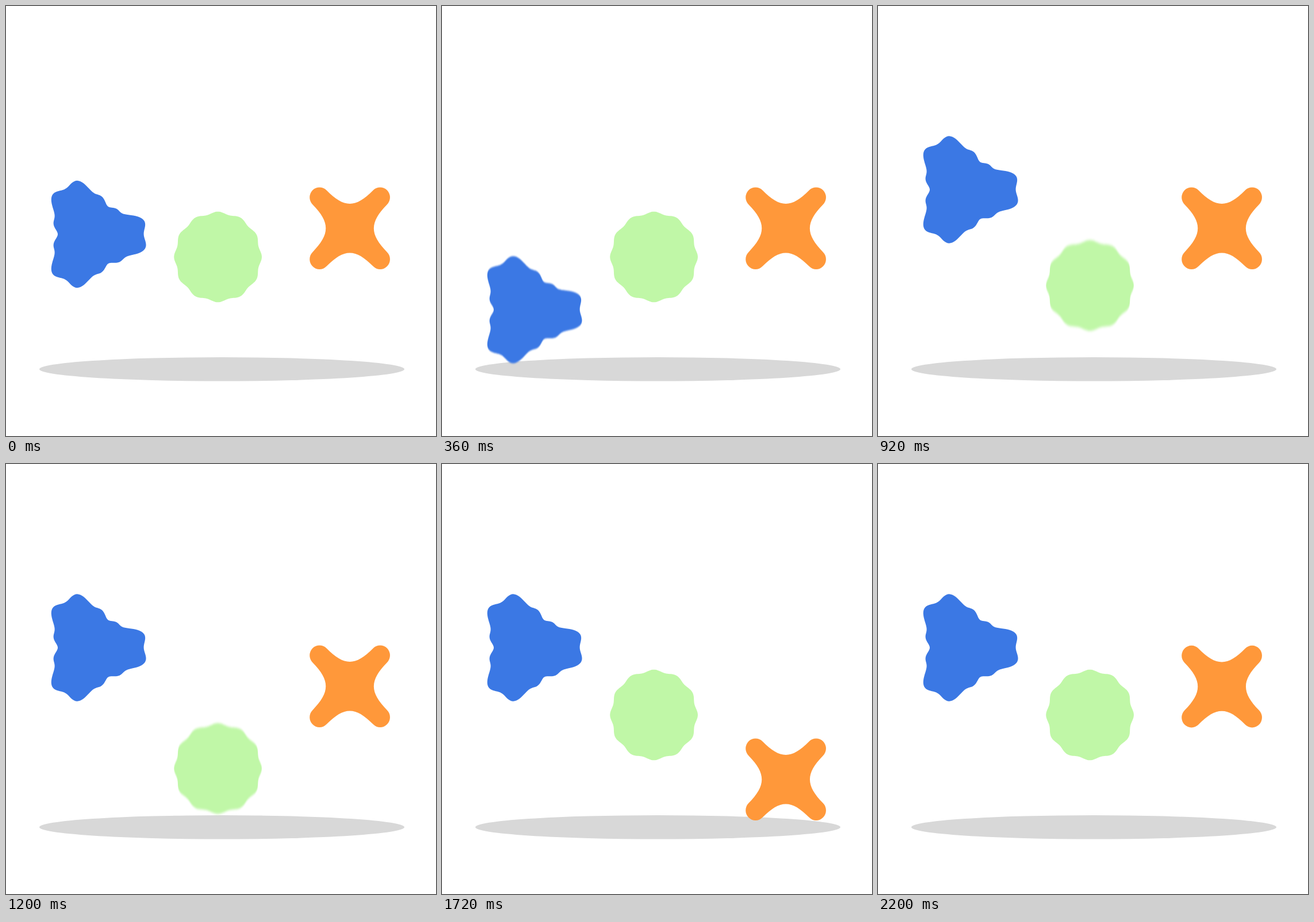
These frames come from a looping animation (748x748 px, 2400 ms). An HTML page:

```html
<!DOCTYPE html>
<html lang="en">
<head>
<meta charset="utf-8">
<title>Bouncing shapes</title>
<style>
  html, body { margin: 0; width: 100%; height: 100%; overflow: hidden; background: #fff; }
  svg { display: block; width: 100vw; height: 100vh; }
</style>
</head>
<body>
<svg id="stage" viewBox="0 0 748 748">
  <ellipse cx="375.5" cy="631.8" rx="317.5" ry="20.8" fill="#d8d8d8"/>
</svg>
<script>
const LOOP = 2400, STEP = 40, LAST = 2200, SHUTTER = 20;
const stage = document.getElementById('stage');
const { cos, sin, exp, PI } = Math;

// Closed outline from a radius that depends on the angle.
function polar(radius, n = 240) {
  const pts = Array.from({ length: n }, (_, i) => {
    const a = (i / n * 2 - 1) * PI, r = radius(a);
    return `${(r * cos(a)).toFixed(2)} ${(r * sin(a)).toFixed(2)}`;
  });
  return `M${pts.join('L')}Z`;
}

// Three soft corners with twelve ripples, slightly hollow on the upper right side.
const wavyTriangle = polar(a =>
  78.7 + 18 * cos(3 * a) - 1.8 * cos(9 * a) - 3.75 * cos(12 * a)
  - 7 * exp(-(((a + 0.66) / 0.38) ** 2)));

const scallop = polar(a =>
  75.7 - 1.25 * cos(2 * a) + 0.9 * sin(2 * a) ** 2 + 1.9 * cos(12 * a));

// Four arms with round tips, joined by concave curves.
function crossPath(reach, waist, tip) {
  const mid = reach - tip, k = tip * Math.SQRT1_2;
  const x = mid - k, y = mid + k, pull = (y - waist) / 0.75;
  let d = `M${-x} ${-y}`;
  for (let i = 0; i < 4; i++) {
    const turn = (px, py) => {
      const c = [1, 0, -1, 0][i], s = [0, 1, 0, -1][i];
      return `${px * c - py * s} ${px * s + py * c}`;
    };
    d += `C${turn(pull - x, pull - y)} ${turn(x - pull, pull - y)} ${turn(x, -y)}`;
    d += `A${tip} ${tip} 0 0 1 ${turn(y, -x)}`;
  }
  return d + 'Z';
}

// keys: start, floor contact and end of the bounce in ms; drop and rest are offsets from y.
const shapes = [
  { d: wavyTriangle, fill: '#3b78e4', x: 148.8, y: 397, keys: [0, 420, 910], drop: 139, rest: -77.5 },
  { d: scallop, fill: '#c0f7a7', x: 368.6, y: 436.5, keys: [760, 1110, 1440], drop: 114, rest: 0 },
  { d: crossPath(71.3, 42.7, 17.5), fill: '#ff983a', x: 598.1, y: 386.7, squeeze: 0.98,
    keys: [1318, 1722, 2215], drop: 162, rest: 0 }
];

function add(parent, name, attrs) {
  const el = document.createElementNS('http://www.w3.org/2000/svg', name);
  for (const k in attrs) el.setAttribute(k, attrs[k]);
  return parent.appendChild(el);
}

shapes.forEach((s, i) => {
  const filter = add(stage, 'filter', {
    id: 'blur' + i, x: '-15%', y: '-25%', width: '130%', height: '150%',
    'color-interpolation-filters': 'sRGB'
  });
  s.blur = add(filter, 'feGaussianBlur', { stdDeviation: 0 });
  s.path = add(stage, 'path', { d: s.d, fill: s.fill });
  s.filter = `url(#blur${i})`;
});

function ease(t, from, to) {
  const u = Math.min(1, Math.max(0, (t - from) / (to - from)));
  return u * u * (3 - 2 * u);
}

const offset = ({ keys: [a, b, c], drop, rest }, t) =>
  drop * ease(t, a, b) + (rest - drop) * ease(t, b, c);

function draw(t) {
  for (const s of shapes) {
    s.path.setAttribute('transform',
      `translate(${s.x} ${s.y + offset(s, t)}) scale(${s.squeeze || 1} 1)`);
    // Vertical motion blur: spread of the distance covered while the shutter is open.
    const travel = Math.abs(offset(s, t + SHUTTER / 2) - offset(s, t - SHUTTER / 2));
    const spread = travel / Math.sqrt(12);
    s.blur.setAttribute('stdDeviation', `0 ${spread.toFixed(2)}`);
    s.path.setAttribute('filter', spread > 0.2 ? s.filter : 'none');
  }
}

function tick() {
  const t = (performance.now() + 1) % LOOP;
  draw(Math.min(LAST, Math.floor(t / STEP) * STEP));
  requestAnimationFrame(tick);
}
tick();
</script>
</body>
</html>
```
